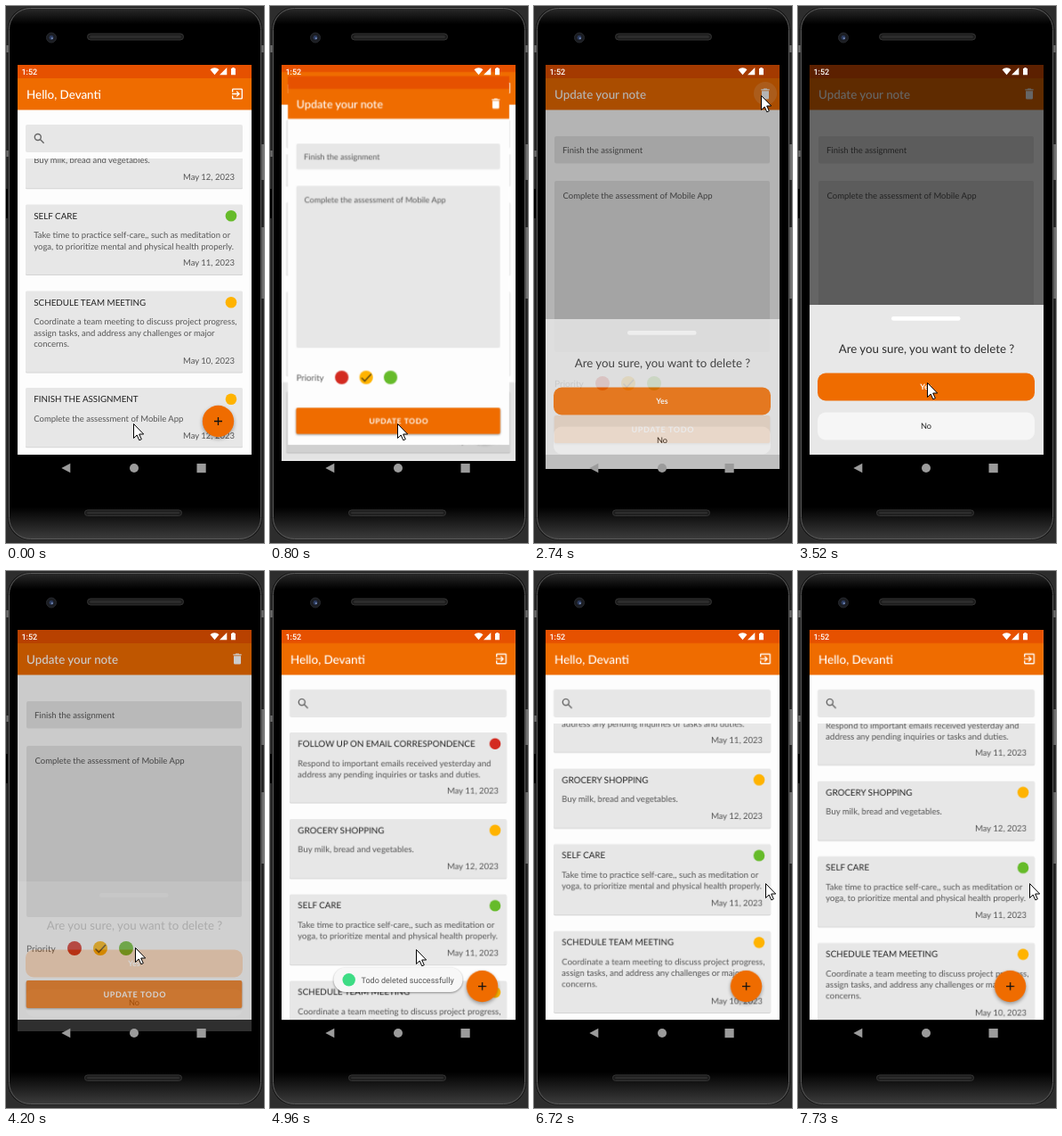
Recreate the animation shown at these times as an HTML page. Size 290x602 px, loop 8000 ms.

```html
<!DOCTYPE html>
<html lang="en">
<head>
<meta charset="utf-8">
<title>Todo app</title>
<style>
html, body { margin: 0; width: 100%; height: 100%; overflow: hidden; background: #2d2d2d; }
svg { display: block; width: 290px; height: 602px; }
text { font: 9.5px Lato, "Open Sans", sans-serif; fill: #555; text-rendering: geometricPrecision; }
.bar { fill: #ef6c00; }
.status { fill: #e65100; }
.paper { fill: #fdfdfd; }
.field { fill: #e7e7e7; }
.card { filter: drop-shadow(0 1px .6px rgba(0, 0, 0, .16)); }
.raised { filter: drop-shadow(0 1px 1px rgba(0, 0, 0, .4)); }
.fab { filter: drop-shadow(0 2px 2px rgba(0, 0, 0, .35)); }
.head { font-size: 13.4px; font-weight: 500; fill: #fff; }
.name { font-size: 9.8px; fill: #222; }
.date { text-anchor: end; }
.mid { text-anchor: middle; }
.ask { font-size: 13.25px; fill: #2c2c2c; }
.white { fill: #fff; }
.sys { font-family: Roboto, sans-serif; font-size: 9px; }

.a { animation: 8s step-end infinite; }
.home, .edit { transform-origin: 144.5px 300px; }
.home { animation-name: home; }
.scroll { animation-name: scroll; transform-origin: 0 550px; }
.dot { animation-name: dot; }
.row { animation-name: row; }
.edit { animation-name: edit; }
.press { animation-name: press; }
.dim { animation-name: dim; }
.sheet { animation-name: sheet; }
.toast { animation-name: toast; }
.cursor { animation-name: cursor; }

@keyframes home {
  0% { transform: none; }
  10% { transform: scale(1.032); }
  11.875% { transform: scale(1.05); }
  13.75% { transform: none; }
  54% { transform: scale(1.035); }
  55.5% { transform: scale(1.004); }
  57.375% { transform: none; }
}
@keyframes scroll {
  0% { transform: translateY(-140px); }
  13.75% { transform: none; }
  74.125% { transform: translateY(-24px); }
  75.625% { transform: translateY(-52px); }
  79.125% { transform: translateY(-55.5px) scaleY(1.014); }
  80.625% { transform: translateY(-55.5px) scaleY(1.018); }
  82.125% { transform: translateY(-55.5px) scaleY(1.01); }
  84% { transform: translateY(-55.5px) scaleY(1.004); }
  85.875% { transform: translateY(-55.5px); }
  91.625% { transform: translateY(-48px); }
  96.625% { transform: translateY(-42.5px); }
}
@keyframes dot { 0% { opacity: 0; } 6.25% { opacity: .06; } 8.125% { opacity: 0; } }
@keyframes row { 0% { opacity: 0; } 8.125% { opacity: .1; } 13.75% { opacity: 0; } }
@keyframes edit {
  0% { opacity: 0; }
  10% { opacity: 1; transform: scale(.946); }
  11.875% { opacity: 1; transform: scale(.997); }
  13.75% { opacity: 1; transform: none; }
  54% { opacity: .4; transform: scale(.93); }
  55.5% { opacity: 0; transform: none; }
}
@keyframes press { 0% { opacity: 0; } 31.25% { opacity: .1; } 32.75% { opacity: .15; } 35.75% { opacity: .07; } 37.25% { opacity: 0; } }
@keyframes dim {
  0% { opacity: 0; }
  32.75% { opacity: .1; }
  34.25% { opacity: .29; }
  35.75% { opacity: .46; }
  37.25% { opacity: .56; }
  38.75% { opacity: .6; }
  51% { opacity: .45; }
  52.5% { opacity: .2; }
  54% { opacity: 0; }
}
@keyframes sheet {
  0% { opacity: 0; }
  32.75% { opacity: .35; transform: translateY(17px); }
  34.25% { opacity: .82; transform: translateY(16px); }
  35.75% { opacity: .97; transform: translateY(5px); }
  37.25% { opacity: 1; transform: translateY(1px); }
  38.75% { opacity: 1; transform: none; }
  51% { opacity: .75; transform: translateY(5px); }
  52.5% { opacity: .2; transform: translateY(13px); }
  54% { opacity: 0; }
}
@keyframes toast { 0% { opacity: 0; } 57.375% { opacity: 1; } 80.625% { opacity: .5; } 82.125% { opacity: 0; } }
@keyframes cursor {
  0% { transform: translate(143px, 468px); }
  18.375% { transform: translate(174px, 438px); }
  20.25% { transform: translate(196px, 400px); }
  21.75% { transform: translate(238px, 300px); }
  23.25% { transform: translate(271px, 190px); }
  24.75% { transform: translate(277px, 120px); }
  26.25% { transform: translate(255px, 100px); }
  37.25% { transform: translate(268px, 170px); }
  38.75% { transform: translate(277px, 301px); }
  40.5% { transform: translate(225px, 360px); }
  42.125% { transform: translate(159px, 410px); }
  44% { transform: translate(145px, 422px); }
  62% { transform: translate(164px, 424px); }
  63.875% { transform: translate(218px, 437px); }
  65.75% { transform: translate(224px, 384px); }
  67.625% { transform: translate(256px, 356px); }
  69.125% { transform: translate(260px, 350px); }
}
</style>
</head>
<body>
<svg viewBox="0 0 290 602">
  <defs>
    <clipPath id="screen"><rect x="13" y="66" width="263" height="470"/></clipPath>
    <clipPath id="list"><rect x="13" y="171" width="263" height="332"/></clipPath>
    <linearGradient id="shell" x2="0" y2="1">
      <stop offset="0" stop-color="#2a2a2a"/><stop offset=".03" stop-color="#000"/>
      <stop offset=".94" stop-color="#000"/><stop offset="1" stop-color="#3c3c3c"/>
    </linearGradient>
  </defs>

  <!-- phone -->
  <rect x="1" y=".5" width="288" height="599" rx="26" fill="#1c1c1c" stroke="#333"/>
  <rect x="3.5" y="2.5" width="283" height="595" rx="24" fill="url(#shell)" stroke="#5c5c5c"/>
  <path d="M1.5 44v8M1.5 162v7M288.5 44v8" stroke="#777" stroke-width="2"/>
  <path d="M1 205v33" stroke="#000" stroke-width="2"/>
  <path d="M288.7 155v40M288.7 248v80" stroke="#777" stroke-width="2.4"/>
  <rect x="91.5" y="31" width="108" height="7" rx="3.5" fill="#1c1c1c" stroke="#343434"/>
  <rect x="94" y="33" width="103" height="3" rx="1.5" fill="#2c2c2c"/>
  <rect x="88.5" y="565" width="109" height="6.5" rx="3.2" fill="#1c1c1c" stroke="#343434"/>
  <rect x="91" y="567" width="104" height="2.5" rx="1.2" fill="#2c2c2c"/>
  <circle cx="51" cy="35.5" r="5.5" fill="#1b1d22" stroke="#26282d"/>
  <circle cx="51" cy="35.5" r="2.4" fill="#2c3c60"/>
  <circle cx="51.8" cy="36.2" r="1" fill="#8094c0"/>

  <g clip-path="url(#screen)">
    <rect x="13" y="66" width="263" height="470"/>

    <g class="a home">
      <rect class="paper" x="13" y="66" width="263" height="437"/>
      <rect class="status" x="13" y="66" width="263" height="15.5"/>
      <rect class="bar" x="13" y="81" width="263" height="35.5"/>
      <text class="head" x="23" y="104">Hello, Devanti</text>
      <path class="white" transform="translate(252 90.5) scale(.667)" d="M10.1 15.6 11.5 17l5-5-5-5-1.4 1.4 2.6 2.6H3v2h9.7zM19 3H5a2 2 0 0 0-2 2v4h2V5h14v14H5v-4H3v4a2 2 0 0 0 2 2h14a2 2 0 0 0 2-2V5a2 2 0 0 0-2-2z"/>
      <rect class="field" x="22" y="133" width="244" height="31" rx="2"/>
      <g fill="none" stroke="#666" stroke-width="1.4">
        <circle cx="35.8" cy="147" r="3.5"/><path d="M38.4 149.6 42.6 153.8"/>
      </g>
      <g clip-path="url(#list)">
        <g class="a scroll" id="cards"></g>
        <circle class="a dot" cx="143" cy="468" r="12"/>
        <rect class="a row" x="13" y="418" width="263" height="85"/>
      </g>
      <circle class="bar fab" cx="238.5" cy="465.5" r="17.7"/>
      <path d="M234 465.5h9M238.5 461v9" stroke="#111" stroke-width="1.3"/>
    </g>

    <g class="a edit">
      <rect class="paper" x="13" y="66" width="263" height="437"/>
      <rect class="status" x="13" y="66" width="263" height="15.5"/>
      <rect class="bar" x="13" y="81" width="263" height="35.5"/>
      <text class="head" x="23" y="104">Update your note</text>
      <path class="white" transform="translate(252 90.5) scale(.667)" d="M6 19a2 2 0 0 0 2 2h8a2 2 0 0 0 2-2V7H6zM19 4h-3.5l-1-1h-5l-1 1H5v2h14z"/>
      <circle class="a press white" cx="260" cy="98" r="13"/>
      <rect class="field" x="23" y="146" width="242" height="30.5" rx="2"/>
      <text x="32" y="164.5">Finish the assignment</text>
      <rect class="field" x="23" y="196" width="242" height="192" rx="2"/>
      <text x="32.5" y="216">Complete the assessment of Mobile App</text>
      <text x="23" y="427" style="font-size:10.1px">Priority</text>
      <circle cx="77" cy="423" r="8" fill="#d32a20"/>
      <circle cx="106" cy="423" r="8" fill="#ffb300"/>
      <circle cx="135" cy="423" r="8" fill="#66bb2a"/>
      <path d="M100.5 423.5 104.3 427.3 112 419" fill="none" stroke="#5d4710" stroke-width="1.5"/>
      <rect class="bar raised" x="22.7" y="459" width="242.6" height="31" rx="2"/>
      <text class="mid white" x="144.8" y="478.3" style="font-size:9px;font-weight:700;letter-spacing:.65px">UPDATE TODO</text>
    </g>

    <rect class="a dim" x="13" y="66" width="263" height="437"/>

    <g class="a sheet">
      <rect x="13" y="335" width="263" height="168" fill="#e8e8e8"/>
      <rect class="white" x="105" y="348" width="77.5" height="4.7" rx="2.3"/>
      <text class="mid ask" x="144.5" y="388.5">Are you sure, you want to delete ?</text>
      <rect class="bar" x="22" y="411.5" width="244" height="31" rx="9"/>
      <text class="mid white" x="144" y="430.3" style="font-size:8.8px;font-weight:700">Yes</text>
      <rect x="22" y="455.5" width="244" height="31" rx="9" fill="#f6f6f6"/>
      <text class="mid" x="144" y="474.3" style="font-size:9.2px;fill:#222">No</text>
    </g>

    <g class="a toast">
      <rect class="raised" x="71.5" y="444.5" width="145" height="27.5" rx="13.7" fill="#f7f7f7"/>
      <circle cx="88.7" cy="458.3" r="7.2" fill="#3ddc84"/>
      <text class="sys" x="102.5" y="461.6">Todo deleted successfully</text>
    </g>

    <!-- system bars -->
    <g class="white">
      <text class="sys white" x="17.5" y="76.8" style="font-weight:500">1:52</text>
      <path d="M229.5 71.3a7.4 7.4 0 0 1 10 0L234.5 77.3zM248.3 69v8.3H240zM253 70h1.3v-1h2.4v1H258v7.3h-5z"/>
    </g>
    <g fill="#9b9b9b">
      <path d="M62.3 518 72.3 512.8V523.2z"/>
      <circle cx="144" cy="518" r="5"/>
      <rect x="214.5" y="513" width="10.2" height="10.2"/>
    </g>
  </g>

  <path class="a cursor" d="M.5.5V16.5L4.2 13 6.8 18.8 9.3 17.7 6.7 12H11.7z" fill="#fff" stroke="#000"/>
</svg>
<script>
const red = '#d32a20', amber = '#ffb300', green = '#66bb2a';
const notes = [
  [181, red, 'FOLLOW UP ON EMAIL CORRESPONDENCE', 'May 11, 2023',
    'Respond to important emails received yesterday and', 'address any pending inquiries or tasks and duties.'],
  [278, amber, 'GROCERY SHOPPING', 'May 12, 2023', 'Buy milk, bread and vegetables.'],
  [362.5, green, 'SELF CARE', 'May 11, 2023',
    'Take time to practice self-care,, such as meditation or', 'yoga, to prioritize mental and physical health properly.'],
  [459.5, amber, 'SCHEDULE TEAM MEETING', 'May 10, 2023',
    'Coordinate a team meeting to discuss project progress,', 'assign tasks, and address any challenges or major', 'concerns.'],
  [568, amber, 'FINISH THE ASSIGNMENT', 'May 12, 2023', 'Complete the assessment of Mobile App']
];

const label = (cls, x, y, str) => `<text class="${cls}" x="${x}" y="${y}">${str}</text>`;

function card([top, color, name, date, ...lines]) {
  const h = 54 + 12.3 * lines.length;
  return `<rect class="field card" x="22" y="${top}" width="244" height="${h}" rx="1.5"/>` +
    `<circle cx="253" cy="${top + 12.7}" r="6.3" fill="${color}"/>` +
    label('name', 31.3, top + 16, name) +
    lines.map((s, i) => label('', 31.3, top + 37.7 + 12.3 * i, s)).join('') +
    label('date', 257, top + h - 9.8, date);
}

document.getElementById('cards').innerHTML = notes.map(card).join('');
</script>
</body>
</html>
```
